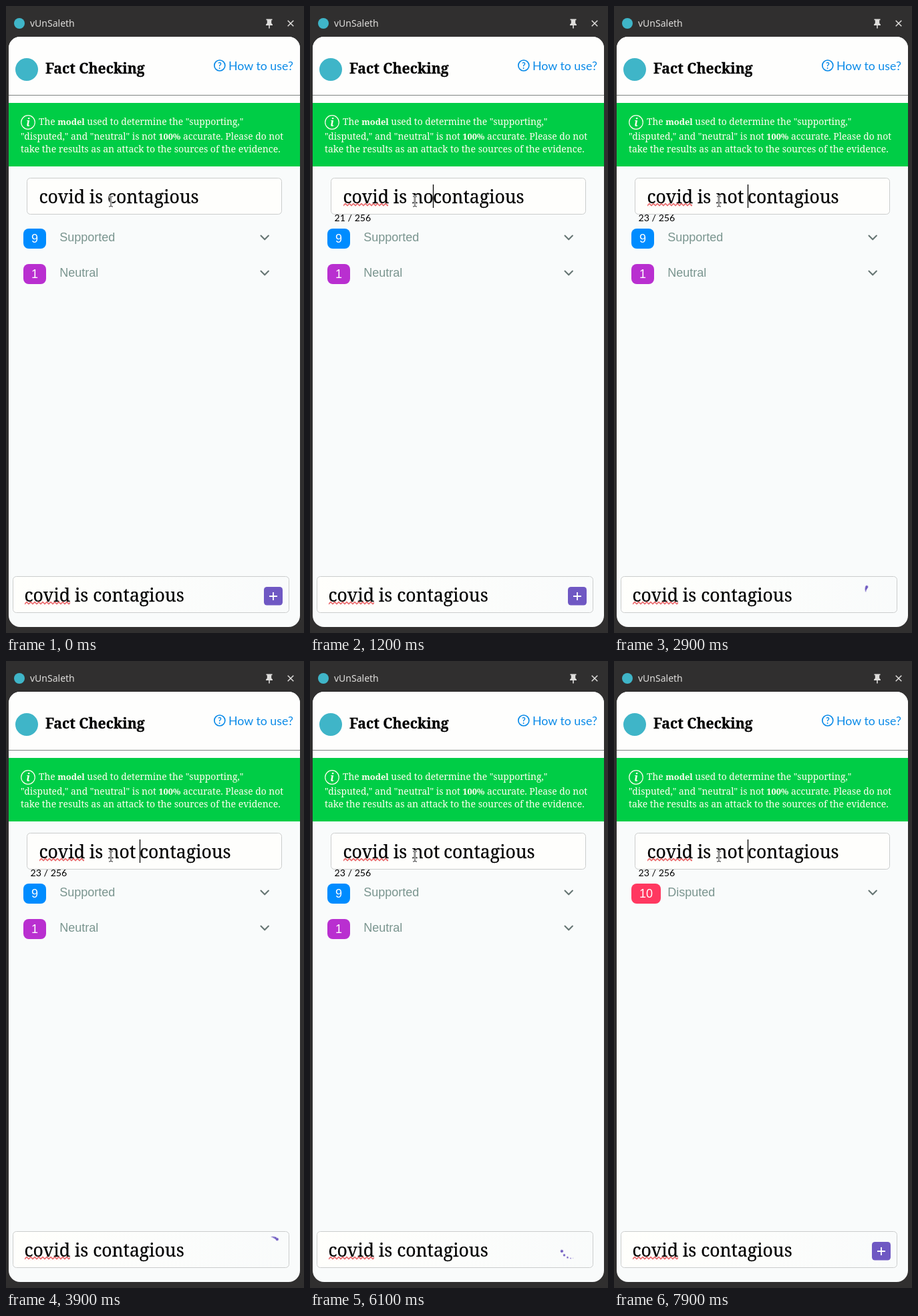
Animation, 446 px wide and 938 px high, one loop 8000 ms. Source, as an HTML page:

```html
<!DOCTYPE html>
<html lang="en">
<head>
<meta charset="utf-8">
<title>Fact Checking</title>
<style>
html, body { margin: 0; width: 100%; height: 100%; overflow: hidden; background: #302f2f; }
svg { position: absolute; left: 0; top: 0; }
text { white-space: pre; }
.slab { font-family: "Noto Serif", serif; }
.entry { font-size: 26.5px; }
.entry text, text.entry { stroke: #000; stroke-width: .25px; }
.title { font-size: 21.2px; font-weight: 700; stroke: #000; stroke-width: .3px; }
.note { font-size: 13.8px; fill: #fffef0; }
.note tspan { font-size: 12.8px; font-weight: 700; }
.ui { font-family: Lato, "Open Sans", sans-serif; }
.label { font: 18px "Liberation Sans", Arial, sans-serif; fill: #7a958f; }
.badge { font: 18px "Liberation Sans", Arial, sans-serif; fill: #fff; text-anchor: middle; }
.count { font-size: 14.2px; }
.chevron { fill: none; stroke: #667573; stroke-width: 2.1; stroke-linecap: round; stroke-linejoin: round; }
.box { fill: #fefefc; stroke: #cbcdcd; }
.caret { stroke: #000; stroke-width: 1.3; }

/* visible only for --len, beginning at --at */
.win { visibility: hidden; animation: on var(--len) var(--at) paused; }
@keyframes on { from, to { visibility: visible; } }

.blink { visibility: hidden; animation: blink 1s 1950ms infinite step-end paused; }
@keyframes blink { 0% { visibility: hidden; } 50%, 100% { visibility: visible; } }

.tail { animation: push 8s infinite step-end paused; }
@keyframes push {
  0% { transform: translateX(0); }
  11.875% { transform: translateX(17px); }
  13.125% { transform: translateX(32px); }
  15.625% { transform: translateX(41px); }
  18.125%, 100% { transform: translateX(48px); }
}

.spinner { position: absolute; left: 382.8px; top: 867.3px; font-size: 21px; }
.spinner i {
  display: block; width: 1em; height: 1em; border-radius: 50%; color: #6c57c0;
  animation: comet 1.7s 2s infinite ease paused, round 1.7s 2s infinite ease paused;
}
@keyframes round { to { transform: rotate(360deg); } }
@keyframes comet {
  0%, 5%, 95%, 100% { box-shadow: 0 -.83em 0 -.4em, 0 -.83em 0 -.42em, 0 -.83em 0 -.44em, 0 -.83em 0 -.46em, 0 -.83em 0 -.477em; }
  10%, 59% { box-shadow: 0 -.83em 0 -.4em, -.087em -.825em 0 -.42em, -.173em -.812em 0 -.44em, -.256em -.789em 0 -.46em, -.297em -.775em 0 -.477em; }
  20% { box-shadow: 0 -.83em 0 -.4em, -.338em -.758em 0 -.42em, -.555em -.617em 0 -.44em, -.671em -.488em 0 -.46em, -.749em -.34em 0 -.477em; }
  38% { box-shadow: 0 -.83em 0 -.4em, -.377em -.74em 0 -.42em, -.645em -.522em 0 -.44em, -.775em -.297em 0 -.46em, -.82em -.09em 0 -.477em; }
}
</style>
</head>
<body>
<svg width="446" height="938" viewBox="0 0 446 938">
  <defs>
    <pattern id="wave" width="6" height="6" patternUnits="userSpaceOnUse">
      <path d="M-1.5 5.5 L0 4 L3 1 L6 4 L7.5 5.5" fill="none" stroke="#e0252b" stroke-width="1.2"/>
    </pattern>
    <linearGradient id="soft"><stop offset="0" stop-color="#fffffc"/><stop offset="1" stop-color="#f9fbfb"/></linearGradient>
    <clipPath id="panel"><rect x="4" y="46" width="436" height="883" rx="17"/></clipPath>
    <path id="chev" class="chevron" d="M381.5 343.6 l5.7 5.7 5.7 -5.7"/>
    <g id="plus">
      <rect x="386" y="869" width="28" height="27.5" rx="4.5" fill="#6f58c3"/>
      <path d="M400 877 v12 M394 883 h12" stroke="#fff" stroke-width="1.8"/>
    </g>
  </defs>

  <!-- window bar -->
  <rect width="446" height="938" fill="#302f2f"/>
  <circle cx="20" cy="26" r="8" fill="#3fb5c8"/>
  <text x="36" y="31" font-family="'Noto Sans', sans-serif" font-size="14" font-weight="500" fill="#dedddb">vUnSaleth</text>
  <path d="M389.5 19.5 h9 v1.7 h-1.3 v4.6 l1.8 2 v1.2 h-4.2 v4 l-.8 1 -.8 -1 v-4 h-4.2 v-1.2 l1.8 -2 v-4.6 h-1.3z" fill="#dedddb"/>
  <path d="M421.7 21.7 l8.6 8.6 m0 -8.6 l-8.6 8.6" stroke="#dedddb" stroke-width="1.5"/>

  <!-- panel -->
  <g clip-path="url(#panel)">
    <rect x="4" y="46" width="436" height="883" fill="#f9fbfb"/>
    <rect x="4" y="46" width="436" height="99" fill="#fefefd"/>
    <rect x="4" y="133" width="436" height="1" fill="#7f8482"/>
    <rect x="4" y="145" width="436" height="95" fill="#00cd46"/>
  </g>
  <circle cx="31" cy="95" r="17" fill="#3fb5c8"/>
  <text class="slab title" x="59" y="100.5">Fact Checking</text>
  <g class="ui" fill="#0b8be8">
    <circle cx="319.8" cy="89" r="8" fill="none" stroke="#0b8be8" stroke-width="1.7"/>
    <text x="319.8" y="93.5" font-size="12.5" font-weight="700" text-anchor="middle">?</text>
    <text x="333" y="96" font-size="17.8">How to use?</text>
  </g>

  <!-- notice -->
  <circle cx="33" cy="174" r="10.3" fill="none" stroke="#fffef0" stroke-width="1.2"/>
  <text class="slab" x="33" y="179.5" font-size="16" font-style="italic" font-weight="700" fill="#fffef0" text-anchor="middle">i</text>
  <g class="slab note">
    <text x="49" y="178">The <tspan>model</tspan> used to determine the "supporting,"</text>
    <text x="22" y="199.5">"disputed," and "neutral" is not <tspan>100%</tspan> accurate. Please do not</text>
    <text x="22" y="219" font-size="14" style="font-size:14px">take the results as an attack to the sources of the evidence.</text>
  </g>

  <!-- claim input -->
  <rect class="box" x="31.5" y="257.5" width="381" height="54" rx="5"/>
  <g class="slab entry">
    <text x="49.5" y="295">covid is</text>
    <text x="152.5" y="295"><tspan class="win" style="--at:950ms;--len:7050ms">n</tspan><tspan class="win" style="--at:1050ms;--len:6950ms">o</tspan><tspan class="win" style="--at:1250ms;--len:6750ms">t</tspan></text>
    <g class="tail">
      <text x="152" y="295">contagious</text>
      <path class="caret win" style="--at:50ms;--len:500ms" d="M152.5 267 V302"/>
      <path class="caret win" style="--at:950ms;--len:1100ms" d="M152.5 267 V302"/>
      <path class="caret blink" d="M152.5 267 V302"/>
    </g>
  </g>
  <g class="win" style="--at:50ms;--len:7950ms">
    <rect width="67" height="6" fill="url(#wave)" transform="translate(50 294.5)"/>
  </g>
  <g class="ui count">
    <text class="win" style="--at:50ms;--len:900ms" x="36.5" y="322">19 / 256</text>
    <text class="win" style="--at:950ms;--len:100ms" x="36.5" y="322">20 / 256</text>
    <text class="win" style="--at:1050ms;--len:200ms" x="36.5" y="322">21 / 256</text>
    <text class="win" style="--at:1250ms;--len:200ms" x="36.5" y="322">22 / 256</text>
    <text class="win" style="--at:1450ms;--len:6550ms" x="36.5" y="322">23 / 256</text>
  </g>

  <!-- results -->
  <use href="#chev"/>
  <g class="win" style="--at:0ms;--len:7150ms">
    <rect x="26" y="333" width="34" height="30" rx="8" fill="#008cff"/>
    <text class="badge" x="43" y="354">9</text>
    <text class="label" x="80.3" y="352">Supported</text>
    <rect x="26" y="386" width="34" height="30" rx="8" fill="#b92fd0"/>
    <text class="badge" x="43" y="407">1</text>
    <text class="label" x="80.3" y="405">Neutral</text>
    <use href="#chev" y="53"/>
  </g>
  <g class="win" style="--at:7150ms;--len:850ms">
    <rect x="26" y="333" width="44" height="30" rx="8" fill="#ff3860"/>
    <text class="badge" x="48" y="354">10</text>
    <text class="label" x="80.3" y="352">Disputed</text>
  </g>

  <!-- bottom entry -->
  <rect class="box" x="10.5" y="853.5" width="413" height="54" rx="5" style="fill:url(#soft)"/>
  <text class="slab entry" x="27.5" y="891">covid is contagious</text>
  <rect width="68" height="6" fill="url(#wave)" transform="translate(28 890.5)"/>
  <use href="#plus" class="win" style="--at:0ms;--len:2050ms"/>
  <use href="#plus" class="win" style="--at:7150ms;--len:850ms"/>

  <!-- pointer -->
  <g fill="none">
    <path d="M154 285 h6 M157 285 v15 M154 300 h6" stroke="#fff" stroke-width="3"/>
    <path d="M154 285 h2.2 l.8 .8 .8 -.8 h2.2 M157 285.5 v14 M154 300 h2.2 l.8 -.8 .8 .8 h2.2" stroke="#222" stroke-width="1"/>
  </g>
</svg>
<div class="spinner win" style="--at:2050ms;--len:5100ms"><i></i></div>
<script>
// One clock drives every paused animation.
const LOOP = 8000;
const anims = document.getAnimations();
const start = performance.now();
function tick() {
  const t = (performance.now() - start) % LOOP;
  for (const a of anims) a.currentTime = t;
  requestAnimationFrame(tick);
}
tick();
</script>
</body>
</html>
```
